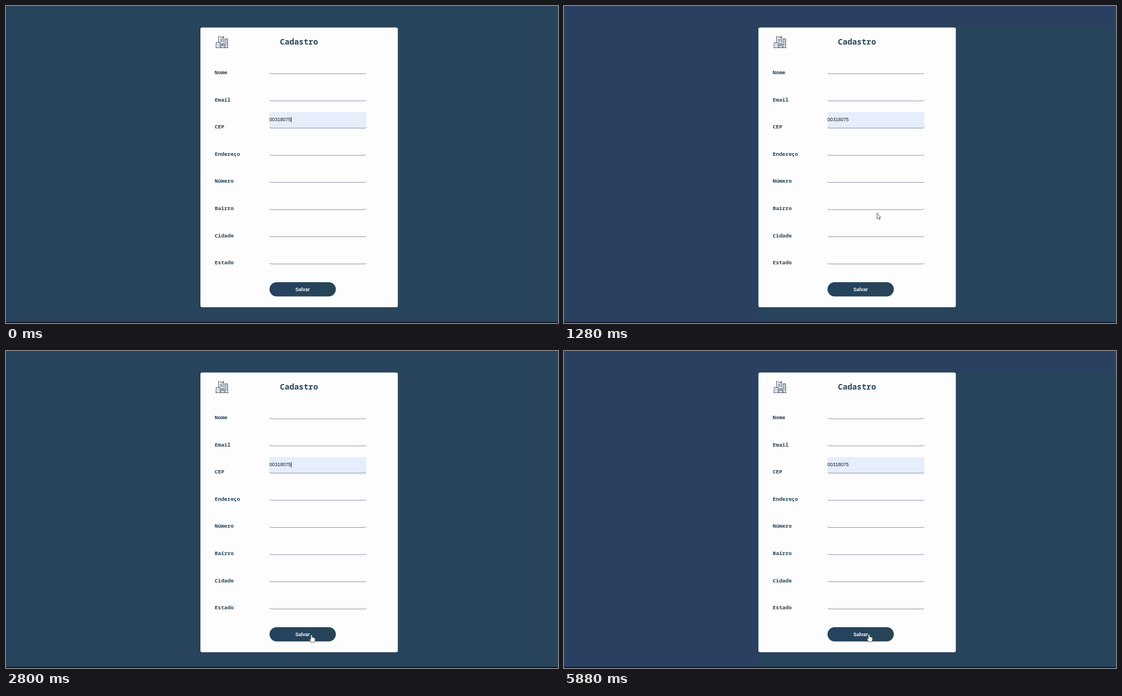
An HTML page for the animation above (8 s loop, 988 by 567 pixels).

```html
<!DOCTYPE html>
<html lang="pt-BR">
<head>
<meta charset="utf-8">
<title>Cadastro</title>
<style>
  html, body { margin: 0; width: 100%; height: 100%; overflow: hidden; background: #28445c; }
  svg { display: block; width: 988px; height: 567px; }
  .mono { font-family: "Noto Sans Mono", monospace; font-weight: 700; fill: #28445a; }
  .title { font-size: 14.2px; }
  .label { font-size: 9.45px; }
  .sans { font: 8.6px "Liberation Sans", Arial, sans-serif; fill: #16181c; }
  .line { fill: none; stroke: #65718f; stroke-width: .75; }
  .icon { fill: none; stroke: #2d4361; stroke-width: .9; }
  .pointer { fill: #fff; stroke: #2c3038; stroke-width: .8; stroke-linejoin: round; }

  #tint { animation: tint 8s step-end infinite; }
  #caret { animation: blink 8s step-end infinite; }
  #arrow { animation: arrow-show 8s step-end infinite, arrow-move 8s linear infinite; }
  #hand { animation: hand-show 8s step-end infinite, hand-move 8s linear infinite; }

  @keyframes tint {
    0%, 8.75%, 33.25% { fill: #28445c; }
    3.25%, 10.25%, 28.25%, 73.5%, 100% { fill: #2b4060; }
    19.5% { fill: #2e4251; }
  }
  @keyframes blink {
    0%, 8.75%, 23%, 35%, 70.25% { opacity: 1; }
    3.25%, 15.75%, 28.75%, 45.75%, 73.5%, 100% { opacity: 0; }
  }
  @keyframes arrow-show {
    0%, 12.5%, 19.5%, 100% { opacity: 0; }
    8.75%, 14% { opacity: 1; }
  }
  @keyframes arrow-move {
    0%, 10.25% { transform: translate(559px, 238.5px); }
    12.5% { transform: translate(558px, 252px); }
    14% { transform: translate(558px, 290px); }
    17.75%, 100% { transform: translate(562px, 440px); }
  }
  @keyframes hand-show {
    0% { opacity: 0; }
    19.5%, 100% { opacity: 1; }
  }
  @keyframes hand-move {
    0%, 19.5% { transform: translate(559px, 497px); }
    22.5%, 26% { transform: translate(554.5px, 508.3px); }
    26.5%, 28.25% { transform: translate(552.5px, 508px); }
    33.25%, 45.74% { transform: translate(546.8px, 507.2px); }
    45.75%, 100% { transform: translate(545.8px, 506.2px); }
  }
</style>
</head>
<body>
<svg viewBox="0 0 988 567" xmlns="http://www.w3.org/2000/svg">
  <defs>
    <linearGradient id="button">
      <stop offset="0" stop-color="#254260"/>
      <stop offset="1" stop-color="#274556"/>
    </linearGradient>
  </defs>
  <rect width="988" height="567" fill="#28445c"/>
  <path id="tint" d="M0 0H988V37H347V566H0Z"/>
  <rect y="565.6" width="988" height="1.4" fill="#05070a"/>
  <rect x="348" y="38.5" width="353.3" height="500.2" rx="3" fill="#fdfdfd"/>

  <g class="icon">
    <path d="M375 74.6H398M376.1 74.5V65.6H383.3V74.5M380.4 65.5V54.4L389.8 57.2V66M387.6 56.4V54M389.6 57V53.4M392.3 74.5V58.6H396.8V74.5M385 74.5V67.5H390.4V74.5"/>
    <path d="M382.6 59.2H388.2M382.6 61.6H388.2M382.6 64H388.2M393.6 61H396M393.6 64H396M393.6 67H396M393.6 70H396"/>
    <path d="M378 68.5H382M378 71.5H382" stroke-dasharray="1.2 1.2"/>
    <circle cx="387.7" cy="70" r="1.3"/>
  </g>
  <text class="mono title" x="490.3" y="68.7">Cadastro</text>

  <rect x="471.5" y="189.7" width="173.5" height="29" rx="3.5" fill="#e6eefb"/>
  <g id="rows"></g>
  <text class="sans" x="471.6" y="206.3">00318075</text>
  <rect id="caret" x="510" y="198.6" width=".9" height="9.8" fill="#16181c"/>

  <rect x="471.6" y="494" width="118.8" height="25.6" rx="12.8" fill="url(#button)"/>
  <text class="sans" x="531" y="509.6" text-anchor="middle" style="font-weight:700;fill:#fff">Salvar</text>

  <path id="arrow" class="pointer" d="M0 0V10.4L2.4 8.2L4 11.6L5.5 10.9L4 7.6H7Z"/>
  <path id="hand" class="pointer" d="M-1.3 1Q0 -.7 1.2 1V5Q2.3 4.3 3 5.4Q4.2 4.8 4.8 6Q6.3 5.6 6.4 7.2V10Q6.2 12 5.2 14H-.4Q-2 11.5 -3.7 9Q-3.6 7.2 -1.3 8.6Z"/>
</svg>
<script>
  const labels = ["Nome", "Email", "CEP", "Endereço", "Número", "Bairro", "Cidade", "Estado"];
  const rowHeight = 48.6;
  document.getElementById("rows").innerHTML = labels.map((label, i) => {
    const y = i * rowHeight;
    return `<text class="mono label" x="373.6" y="${122 + y}">${label}</text>
      <path class="line" d="M472 ${119.4 + y}q.6 1.8 3 1.8h166.6q2.4 0 3-1.8"/>`;
  }).join("");
</script>
</body>
</html>
```
